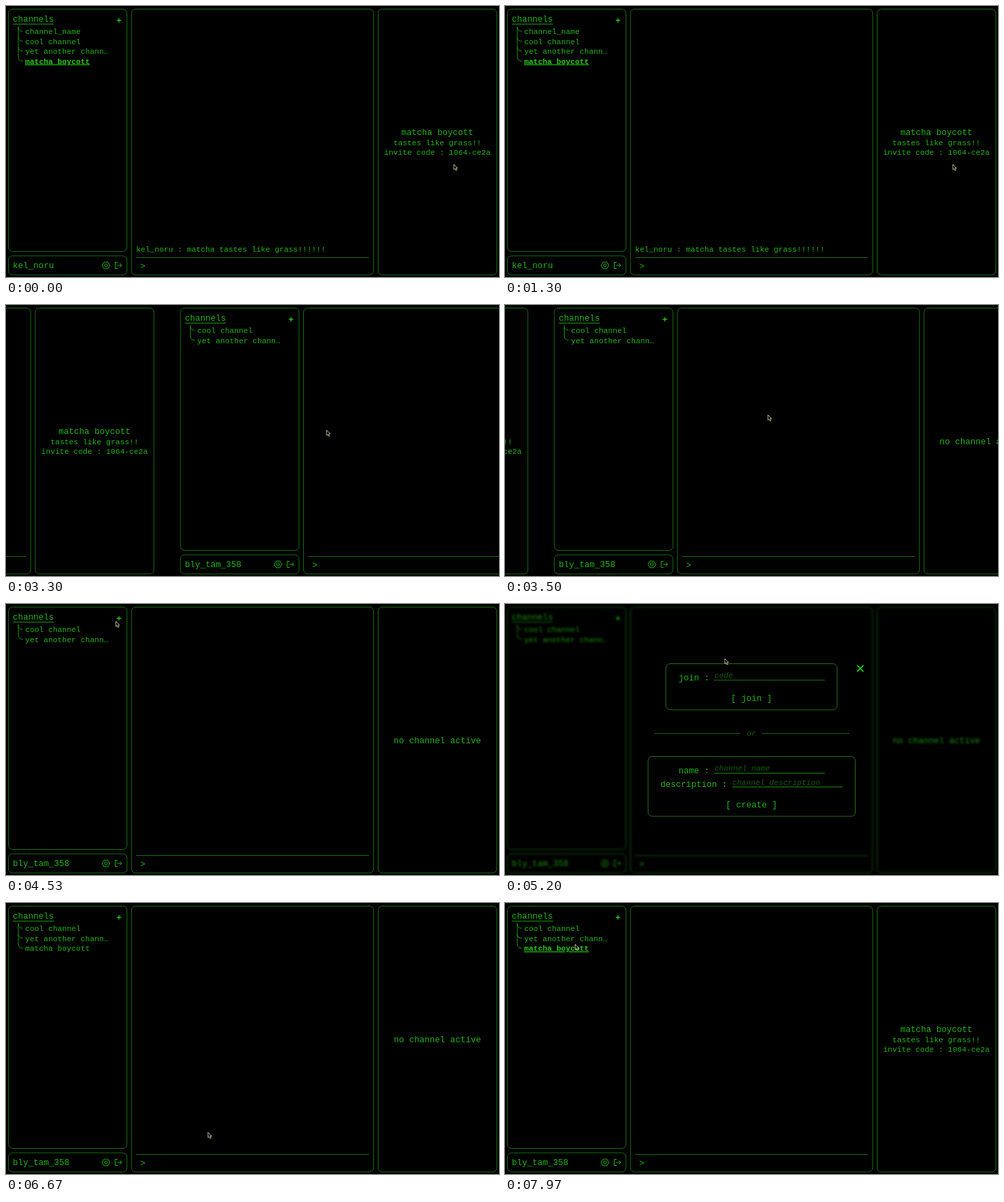
An HTML page for the animation above (8000 ms loop, 720x397 px).

```html
<!DOCTYPE html>
<html lang="en">
<head>
<meta charset="utf-8">
<title>channels</title>
<style>
  html, body { margin: 0; width: 100%; height: 100%; overflow: hidden; background: #000; }
  svg { display: block; width: 100%; height: 100%; }
  text { font: 11.25px "Liberation Mono", monospace; fill: #20b412; white-space: pre; }
  .big { font-size: 12.5px; }
  .mid { text-anchor: middle; }
  .active { font-weight: bold; fill: #27cc14; text-decoration: underline; }
  .hint { font-style: italic; fill: #145a10; }
  .frame { fill: none; stroke: #176e10; }
  .form { fill: none; stroke: #246e14; }
  .rule { fill: none; stroke: #165c10; }
  .line { fill: none; stroke: #1c9410; }
  .icon { fill: none; stroke: #20b412; }
  .plus { fill: none; stroke: #22c414; stroke-width: 1.4; }
  .bright { fill: none; stroke: #2ee61a; stroke-width: 1.6; }
</style>
</head>
<body>
<svg viewBox="0 0 720 397">
  <g id="first"></g>
  <g id="second"></g>
  <g id="modal"></g>
  <circle id="ring" r="10.5" fill="none" stroke="#77700f" stroke-width="1.8"/>
  <path id="cursor" d="M0 0V7.6L1.8 6.1L3.1 9L4.4 8.4L3.2 5.6H5.4Z" fill="#000" stroke="#c8c6a0" stroke-width=".9"/>
</svg>
<script>
const $ = id => document.getElementById(id);
const LOOP = 8000;
const PITCH = 752; // one screen plus the gap between desktops

const text = (x, y, str, cls = '') => `<text x="${x}" y="${y}" class="${cls}">${str}</text>`;
const path = (d, cls) => `<path d="${d}" class="${cls}"/>`;
const box = (x1, y1, x2, y2, cls = 'frame') =>
  `<rect x="${x1}" y="${y1}" width="${x2 - x1}" height="${y2 - y1}" rx="6" class="${cls}"/>`;

function channelList(names, active) {
  return names.map((name, i) => {
    const y = 37 + i * 14.5;
    const top = i ? y - 20.5 : 30;
    return path(`M18 ${top}V${y - 6}Q18 ${y} 24.5 ${y}`, 'line') +
      text(28, y + 4, name, name === active ? 'active' : '');
  }).join('');
}

function screen({ user, names, active, message = '' }) {
  const info = active
    ? text(630, 189, active, 'big mid') +
      text(630, 203.5, 'tastes like grass!!', 'mid') +
      text(630, 218, 'invite code : 1064-ce2a', 'mid')
    : text(630, 203.5, 'no channel active', 'big mid');
  return box(3.5, 4.5, 176.7, 359.5) + box(3.5, 366, 176.7, 394) +
    box(183.3, 4.5, 536.8, 394) + box(543.5, 4.5, 716.8, 394) +
    text(10, 23, 'channels', 'big') + path('M10 26.5H70', 'line') +
    path('M161.8 21H168.2M165 17.8V24.2', 'plus') +
    channelList(names, active) +
    text(10, 384, user, 'big') +
    path('M140.3 380L143.2 375.2H148.8L151.7 380L148.8 384.8H143.2Z', 'icon') +
    '<circle cx="146" cy="380" r="2.2" class="icon"/>' +
    path('M163 375.5H159.5V384.5H163M162.5 380H169M166.3 377.2L169 380L166.3 382.8', 'icon') +
    text(190, 360, message) + path('M190 368.5H530', 'frame') +
    text(196, 385, '&gt;', 'big') + info;
}

function dialog(code) {
  return box(235, 87.5, 485, 155, 'form') + box(209, 223.5, 511.5, 311, 'form') +
    text(253.5, 112, 'join :', 'big') + path('M305 111.5H467', 'frame') +
    text(306, 108, code || 'code', code ? '' : 'hint') +
    text(360, 142, '[ join ]', 'big mid') +
    path('M218 189.5H344M375 189.5H503', 'rule') + text(360, 193, 'or', 'hint mid') +
    text(253.5, 248, 'name :', 'big') + path('M305 248H467', 'line') +
    text(306, 244, 'channel name', 'hint') +
    text(227, 268, 'description :', 'big') + path('M332 268H493', 'line') +
    text(332, 264.5, 'channel description', 'hint') +
    text(360, 298, '[ create ]', 'big mid') +
    path('M514.5 90L523.5 99M523.5 90L514.5 99', 'bright');
}

const target = 'matcha boycott';
const others = ['cool channel', 'yet another chann…'];
const member = { user: 'bly_tam_358', names: others };
const joined = { user: member.user, names: [...others, target] };
const owner = {
  user: 'kel_noru', names: ['channel_name', ...others, target], active: target,
  message: 'kel_noru : matcha tastes like grass!!!!!!'
};
$('first').innerHTML = screen(owner);
const views = [member, joined, { ...joined, active: target }].map(screen);
const dialogs = [dialog(''), dialog('1064-ce2a')];

// Cursor tip: time, x, y
const route = [
  [0, 654, 232], [1500, 654, 232], [2300, 666.5, 236], [2950, 666.5, 236],
  [3500, 384, 161], [3800, 340, 145], [4530, 160.5, 25.5], [4600, 163, 21],
  [4850, 163, 21], [5200, 321, 80], [5350, 335, 104], [5700, 335, 104],
  [5900, 358, 136], [6200, 358, 136], [6600, 295, 336], [6800, 295, 336],
  [7500, 102.5, 60.5], [8000, 102.5, 60.5]
];
const clicks = [2450, 4650, 5380, 5980, 7620];

const ramp = (t, from, to) => Math.min(1, Math.max(0, (t - from) / (to - from)));
const smooth = p => p * p * (3 - 2 * p);

function cursorAt(t) {
  const i = route.findIndex(point => point[0] > t);
  const [t1, x1, y1] = route[i - 1], [t2, x2, y2] = route[i];
  const p = smooth(ramp(t, t1, t2));
  return [x1 + (x2 - x1) * p, y1 + (y2 - y1) * p];
}

function show(el, markup) {
  if (el.shown !== markup) el.innerHTML = el.shown = markup;
}

function draw() {
  const t = performance.now() % LOOP;

  const left = PITCH * (1 - ramp(t, 3050, 3870)) ** 3;
  $('first').setAttribute('transform', `translate(${left - PITCH})`);
  $('second').setAttribute('transform', `translate(${left})`);
  show($('second'), views[t < 6050 ? 0 : t < 7640 ? 1 : 2]);

  const open = smooth(ramp(t, 4720, 4960)) * (1 - smooth(ramp(t, 6400, 6670)));
  $('second').style.opacity = 1 - 0.2 * open;
  $('second').style.filter = open ? `blur(${1.4 * open}px)` : 'none';
  $('modal').style.opacity = open;
  show($('modal'), dialogs[t < 5600 ? 0 : 1]);

  const [x, y] = cursorAt(t);
  $('cursor').setAttribute('transform', `translate(${x} ${y})`);
  $('ring').setAttribute('transform', `translate(${x} ${y + 0.5})`);
  $('ring').style.opacity = clicks.some(c => t >= c && t < c + 220) ? 1 : 0;

  requestAnimationFrame(draw);
}
draw();
</script>
</body>
</html>
```
